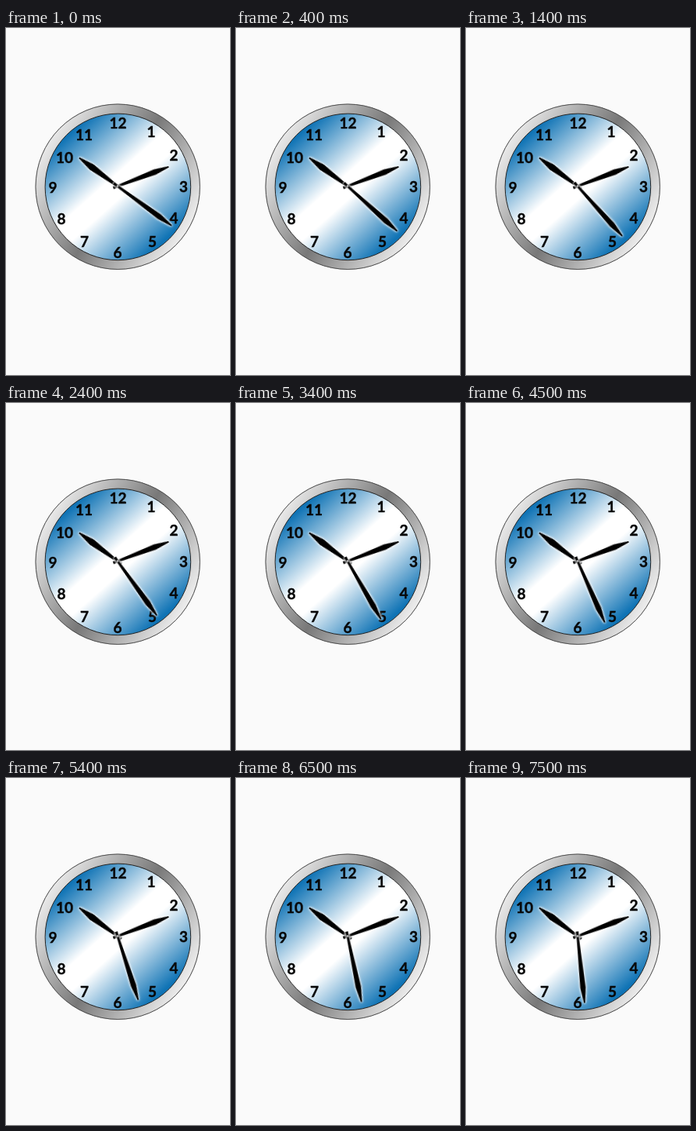
Write an HTML page that moves like this. It is 287 by 442 pixels and loops after 8000 ms.

```html
<!DOCTYPE html>
<html lang="en">
<head>
<meta charset="utf-8">
<title>Wall clock</title>
<style>
  html, body { margin: 0; height: 100%; overflow: hidden; background: #fafafa; }
  svg { display: block; width: 100vw; height: 100vh; }
  text { font: bold 19px Lato, sans-serif; text-anchor: middle; fill: #080808; stroke: #080808; stroke-width: .4; }
  .rim { filter: drop-shadow(.8px .5px .7px rgba(0, 0, 0, .35)); }
  .hand { fill: #000; filter: drop-shadow(0 0 1px #fff) drop-shadow(0 0 1.5px #fff); }
</style>
</head>
<body>
<svg viewBox="0 0 287 442">
  <defs>
    <linearGradient id="metal" gradientUnits="userSpaceOnUse" x1="54" y1="148" x2="232" y2="256">
      <stop offset="0" stop-color="#e8e8e8"/>
      <stop offset=".5" stop-color="#787878"/>
      <stop offset="1" stop-color="#ececec"/>
    </linearGradient>
    <linearGradient id="glass" gradientUnits="userSpaceOnUse" x1="83" y1="134" x2="203" y2="270">
      <stop offset="0" stop-color="#0f73b5"/>
      <stop offset=".43" stop-color="#fff"/>
      <stop offset=".57" stop-color="#fff"/>
      <stop offset="1" stop-color="#0f73b5"/>
    </linearGradient>
  </defs>
  <circle class="rim" cx="143.2" cy="202.2" r="105.2" fill="url(#metal)" stroke="#444" stroke-width=".9"/>
  <circle cx="143.4" cy="202.4" r="93.3" fill="url(#glass)" stroke="#222"/>
  <g id="dial"></g>
  <g id="hands"></g>
  <circle cx="143" cy="201.5" r="1.4" fill="#aaa"/>
</svg>
<script>
const SVG = 'http://www.w3.org/2000/svg';
const TICKS = [400, 1400, 2400, 3400, 4500, 5400, 6500, 7500];
const NUMERALS = [
  [186, 132.5], [215, 162], [227.5, 202.5], [215, 242], [187.5, 272], [143, 286],
  [100.5, 272], [71, 243], [60, 203.5], [75, 165], [100, 136], [143.5, 121.5]
];

function add(parent, tag, attrs) {
  const node = document.createElementNS(SVG, tag);
  for (const name in attrs) node.setAttribute(name, attrs[name]);
  return document.getElementById(parent).appendChild(node);
}

// A hand points up from the pivot and is widest at `belly` pixels out.
function addHand(length, belly, half) {
  const d = `M-1.8 6L-1.4 0L${-half} ${-belly}L-.8 ${-length}H.8L${half} ${-belly}L1.4 0L1.8 6Z`;
  return add('hands', 'path', { class: 'hand', d });
}

function turn(hand, degrees) {
  hand.setAttribute('transform', `translate(143 201.5) rotate(${degrees})`);
}

NUMERALS.forEach(([x, y], i) => {
  add('dial', 'text', { x, y: y + 6.8 }).textContent = i + 1;
});

turn(addHand(61, 41, 4.2), 306.3);
turn(addHand(70, 51, 3.6), 69.3);
const second = addHand(85.5, 66, 3.5);

function draw() {
  const time = performance.now() % 8000;
  const seconds = 21 + TICKS.filter(tick => tick <= time).length;
  turn(second, seconds * 6);
  requestAnimationFrame(draw);
}
draw();
</script>
</body>
</html>
```
